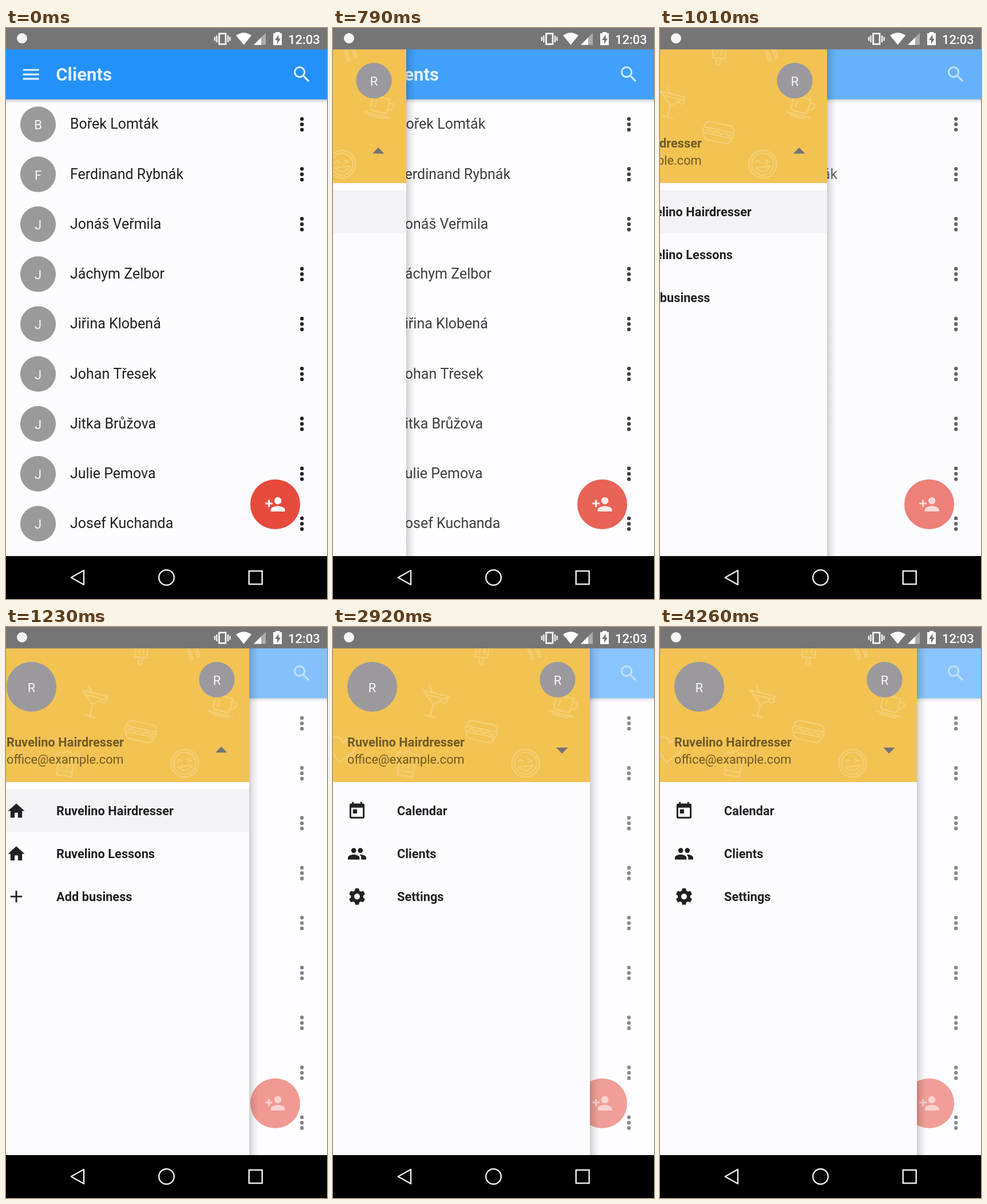
An HTML page with a canvas that plays this animation: 561 px wide and 998 px high, repeating every 4.93 s.

```html
<!DOCTYPE html>
<html lang="en">
<head>
<meta charset="utf-8">
<title>Clients</title>
<style>
  html, body { margin: 0; width: 100%; height: 100%; overflow: hidden; background: #000; }
  canvas { display: block; width: 100%; height: 100%; }
</style>
</head>
<body>
<canvas id="stage"></canvas>
<script>
const W = 561, H = 998, LOOP = 4930;
const TOP = 37.4, BAR = 124.75, HEADER = 271.2, BOTTOM = 923, DRAWER = 449;
const PAPER = '#fcfbfe', INK = '#212023', GREY = '#9b9a9b';
const DP = 1.558, ROW = 56 * DP, ITEM = 48 * DP;

const canvas = document.getElementById('stage');
const ctx = canvas.getContext('2d');
const dpr = window.devicePixelRatio || 1;
canvas.width = W * dpr;
canvas.height = H * dpr;

const people = [
  'Bořek Lomták', 'Ferdinand Rybnák', 'Jonáš Veřmila', 'Jáchym Zelbor', 'Jiřina Klobená',
  'Johan Třesek', 'Jitka Brůžova', 'Julie Pemova', 'Josef Kuchanda'
];

// Icons on a 24 unit grid.
const icon = {
  menu: new Path2D('M3 18h18v-2H3v2zm0-5h18v-2H3v2zm0-7v2h18V6H3z'),
  search: new Path2D('M15.5 14h-.79l-.28-.27A6.47 6.47 0 0 0 16 9.5 6.5 6.5 0 1 0 9.5 16c1.61 0 3.09-.59 4.23-1.57l.27.28v.79l5 4.99L20.49 19l-4.99-5zm-6 0C7.01 14 5 11.99 5 9.5S7.01 5 9.5 5 14 7.01 14 9.5 11.99 14 9.5 14z'),
  addPerson: new Path2D('M15 12a4 4 0 1 0 0-8 4 4 0 0 0 0 8zM6 10V7H4v3H1v2h3v3h2v-3h3v-2H6zm9 4c-2.67 0-8 1.34-8 4v2h16v-2c0-2.66-5.33-4-8-4z'),
  home: new Path2D('M10 20v-6h4v6h5v-8h3L12 3 2 12h3v8z'),
  plus: new Path2D('M19 13h-6v6h-2v-6H5v-2h6V5h2v6h6z'),
  calendar: new Path2D('M19 3h-1V1h-2v2H8V1H6v2H5a2 2 0 0 0-2 2v14a2 2 0 0 0 2 2h14a2 2 0 0 0 2-2V5a2 2 0 0 0-2-2zm0 16H5V8h14v11zM7 10h5v5H7z'),
  group: new Path2D('M16 11a3 3 0 1 0 0-6 3 3 0 0 0 0 6zM8 11a3 3 0 1 0 0-6 3 3 0 0 0 0 6zM8 13c-2.33 0-7 1.17-7 3.5V19h14v-2.5C15 14.17 10.33 13 8 13zm8 0c-.29 0-.62.02-.97.05C16.19 13.89 17 15.02 17 16.5V19h6v-2.5c0-2.33-4.67-3.5-7-3.5z'),
  gear: gearPath()
};

const accountItems = [['home', 'Ruvelino Hairdresser'], ['home', 'Ruvelino Lessons'], ['plus', 'Add business']];
const menuItems = [['calendar', 'Calendar'], ['group', 'Clients'], ['gear', 'Settings']];

// Times at which the drawer jumps and its right edge from then on.
const marks = [340, 450, 560, 670, 790, 900, 1010, 1120, 1230, 1350, 1460];
const edges = [0, 4, 16, 65, 128, 210, 292, 370, 425, 446, DRAWER];

function gearPath() {
  const path = new Path2D(), rad = Math.PI / 180;
  const tooth = [[-22, 7.5], [-12, 10.1], [12, 10.1], [22, 7.5]];
  for (let i = 0; i < 6; i++) {
    for (const [deg, r] of tooth) {
      const a = (i * 60 - 90 + deg) * rad;
      path.lineTo(12 + r * Math.cos(a), 12 + r * Math.sin(a));
    }
  }
  path.closePath();
  path.moveTo(15.5, 12);
  path.arc(12, 12, 3.5, 0, 7);
  return path;
}

function rect(x, y, w, h, color) {
  ctx.fillStyle = color;
  ctx.fillRect(x, y, w, h);
}

function disc(x, y, r, color) {
  ctx.fillStyle = color;
  ctx.beginPath();
  ctx.arc(x, y, r, 0, 7);
  ctx.fill();
}

function shape(d, color) {
  ctx.fillStyle = color;
  ctx.fill(new Path2D(d));
}

function text(str, x, y, size, color, weight = 400, align = 'left') {
  ctx.font = `${weight} ${size}px Roboto, sans-serif`;
  ctx.textAlign = align;
  ctx.fillStyle = color;
  ctx.fillText(str, x, y);
}

function drawIcon(name, cx, cy, scale, color, alpha = 1) {
  ctx.save();
  ctx.globalAlpha = alpha;
  ctx.translate(cx - 12 * scale, cy - 12 * scale);
  ctx.scale(scale, scale);
  ctx.fillStyle = color;
  ctx.fill(icon[name], 'evenodd');
  ctx.restore();
}

function avatar(letter, x, y, r, color = GREY) {
  disc(x, y, r, color);
  text(letter, x, y + 9, 22, '#f8f8f8', 400, 'center');
}

function shade(x, y, w, h, dx, dy, alpha) {
  const g = ctx.createLinearGradient(x, y, x + dx, y + dy);
  for (const [stop, k] of [[0, 1], [.35, .5], [1, 0]]) g.addColorStop(stop, `rgba(0,0,0,${alpha * k})`);
  rect(x, y, w, h, g);
}

function statusBar() {
  rect(0, 0, W, TOP, '#757575');
  disc(28, 18, 9, '#f4f4f4');
  ctx.strokeStyle = '#fff';
  ctx.lineWidth = 2.6;
  ctx.strokeRect(372.5, 9.8, 11.5, 18.4);
  for (const side of [-1, 1]) {
    const x = 378.2 + side * 9.8;
    rect(x - 1.1, 13, 2.2, 12, '#fff');
    rect(x + side * 3.5 - 1.1, 15.5, 2.2, 7, '#fff');
  }
  shape('M402 13Q415.500 3.500 429 13L415.500 29.500z', '#fff');
  shape('M433 29.500H454V8.500z', 'rgba(255,255,255,.4)');
  shape('M433 29.500H446V16.500z', '#fff');
  shape('M471 9V7h7.500v2H482v21h-15V9z', '#fff');
  shape('M476.500 11.500l-6.500 9.500h4v7l6-9.500h-3.500z', '#757575');
  text('12:03', 493, 27.5, 22, '#fff', 500);
}

function navBar() {
  rect(0, BOTTOM, W, H - BOTTOM, '#000');
  ctx.strokeStyle = '#ebebeb';
  ctx.lineWidth = 2.5;
  ctx.lineJoin = 'round';
  ctx.stroke(new Path2D('M113.800 960.500L136 948V973z'));
  ctx.lineJoin = 'miter';
  ctx.beginPath();
  ctx.arc(280.5, 960.5, 13.3, 0, 7);
  ctx.stroke();
  ctx.strokeRect(424.7, 949.1, 23, 23);
}

function clientList(open) {
  const fade = 1 - .45 * open;
  rect(0, 0, W, BOTTOM, PAPER);
  people.forEach((name, i) => {
    const y = 168.4 + i * ROW;
    avatar(name[0], 56, y, 31.1);
    text(name, 112, y + 8, 25, INK);
    for (const d of [-1, 0, 1]) disc(517.2, y + d * 9.35, 3.2, INK);
  });
  rect(0, 0, W, BAR, '#2391f9');
  shade(0, BAR, W, 7, 0, 7, .22);
  drawIcon('menu', 43.6, 81.1, DP, '#e2f0ff');
  text('Clients', 87.2, 92, 31.2, '#e2f0ff', 700);
  drawIcon('search', 517, 81, DP, '#e2f0ff', fade);
  disc(470.5, 832.5, 43.6, '#e64a3c');
  drawIcon('addPerson', 470.5, 832.5, DP, '#fff', fade);
}

function doodle(x, y, deg, d) {
  ctx.save();
  ctx.translate(x, y);
  ctx.rotate(deg * Math.PI / 180);
  ctx.stroke(new Path2D(d));
  ctx.restore();
}

function doodles() {
  ctx.strokeStyle = 'rgba(255,255,255,.19)';
  ctx.lineWidth = 2.6;
  ctx.lineCap = ctx.lineJoin = 'round';
  // ice lolly, straws, cocktail, cup
  doodle(261, 38, 6, 'M-11-9V15H11V-9M-3 15V27H3V15M-4-4V8M4-4V8');
  doodle(349, 38, -18, 'M-8-6V17H-4V-6M5-6V17H9V-6');
  doodle(180, 116, 14, 'M-23 0H23L0 20zM0 20V41M-9 41H9M-13 6H13M12 9a5 5 0 1 0 8-5M-8-2L-14-10');
  doodle(402, 137, 14, 'M-15-16H15V4Q15 10 9 10H-9Q-15 10-15 4zM15-10H23Q27 0 15 3M-22 15H22M-16 15L-12 19H12L16 15M-7-8V2');
  // hot dog, smiley, heart, chef hat
  doodle(259, 183, 12, 'M-19-16H19Q27-14 26-5H-26Q-27-14-19-16zM-26-5Q-30 1-25 5H25Q30 1 26-5M-25 5Q-24 15-16 16H16Q24 15 25 5M-22 1l6-3 7 4 7-4 7 4 7-4 7 4 5-3');
  doodle(336.500, 238, -8, 'M24 0A24 24 0 1 1-24 0A24 24 0 1 1 24 0M19 0A19 19 0 1 1-19 0A19 19 0 1 1 19 0M-13 5Q0 21 13 5zM-12-4Q-8-10-4-4M5-6L12-3L5-1');
  doodle(15, 214, 10, 'M0 23L-22 0Q-28-18-13-20Q-3-21 0-11Q5-22 16-18Q29-10 19 3z');
  doodle(128, 238, 8, 'M-13 22V-2Q-22-6-17-14Q-12-20-6-16Q0-26 8-17Q17-20 19-11Q20-4 14-2V22zM-13 14H14M-5 8V0M5 8V0');
  ctx.lineCap = 'butt';
  ctx.lineJoin = 'miter';
}

function header(accounts) {
  ctx.save();
  ctx.beginPath();
  ctx.rect(0, 0, DRAWER, HEADER);
  ctx.clip();
  rect(0, 0, DRAWER, HEADER, '#f2c353');
  doodles();
  avatar('R', 68.5, 104.5, 43.6, '#9b999d');
  avatar('R', 392.5, 92, 31.1, '#9b999d');
  text('Ruvelino Hairdresser', 25, 209, 21.8, '#715a25', 700);
  text('office@example.com', 25, 238.5, 21.8, '#715a25');
  shape(accounts ? 'M390 219.500H410.500L400.200 209z' : 'M390 210.800H410.500L400.200 221.300z', '#757378');
  ctx.restore();
}

function drawer(edge, accounts) {
  ctx.save();
  ctx.translate(edge - DRAWER, 0);
  shade(DRAWER, 0, 16, BOTTOM, 16, 0, .19);
  rect(0, 0, DRAWER, BOTTOM, PAPER);
  header(accounts);
  if (accounts) rect(0, 284, DRAWER, 74.5, '#f3f2f6');
  (accounts ? accountItems : menuItems).forEach(([name, label], i) => {
    const y = 321.6 + i * ITEM;
    drawIcon(name, 42, y, 1.45, INK);
    text(label, 112, y + 7.6, 21.8, INK, 700);
  });
  ctx.restore();
}

function edgeAt(t) {
  const passed = marks.filter(m => t >= m).length;
  return passed ? edges[passed - 1] : 0;
}

function draw(t) {
  ctx.setTransform(dpr, 0, 0, dpr, 0, 0);
  const edge = edgeAt(t), open = edge / DRAWER;
  clientList(open);
  if (edge > 0) {
    rect(0, 0, W, BOTTOM, `rgba(252,252,254,${.47 * open})`);
    drawer(edge, t < 2920);
  }
  statusBar();
  navBar();
}

const start = performance.now();
function tick() {
  draw((performance.now() - start) % LOOP);
  requestAnimationFrame(tick);
}
tick();
</script>
</body>
</html>
```
